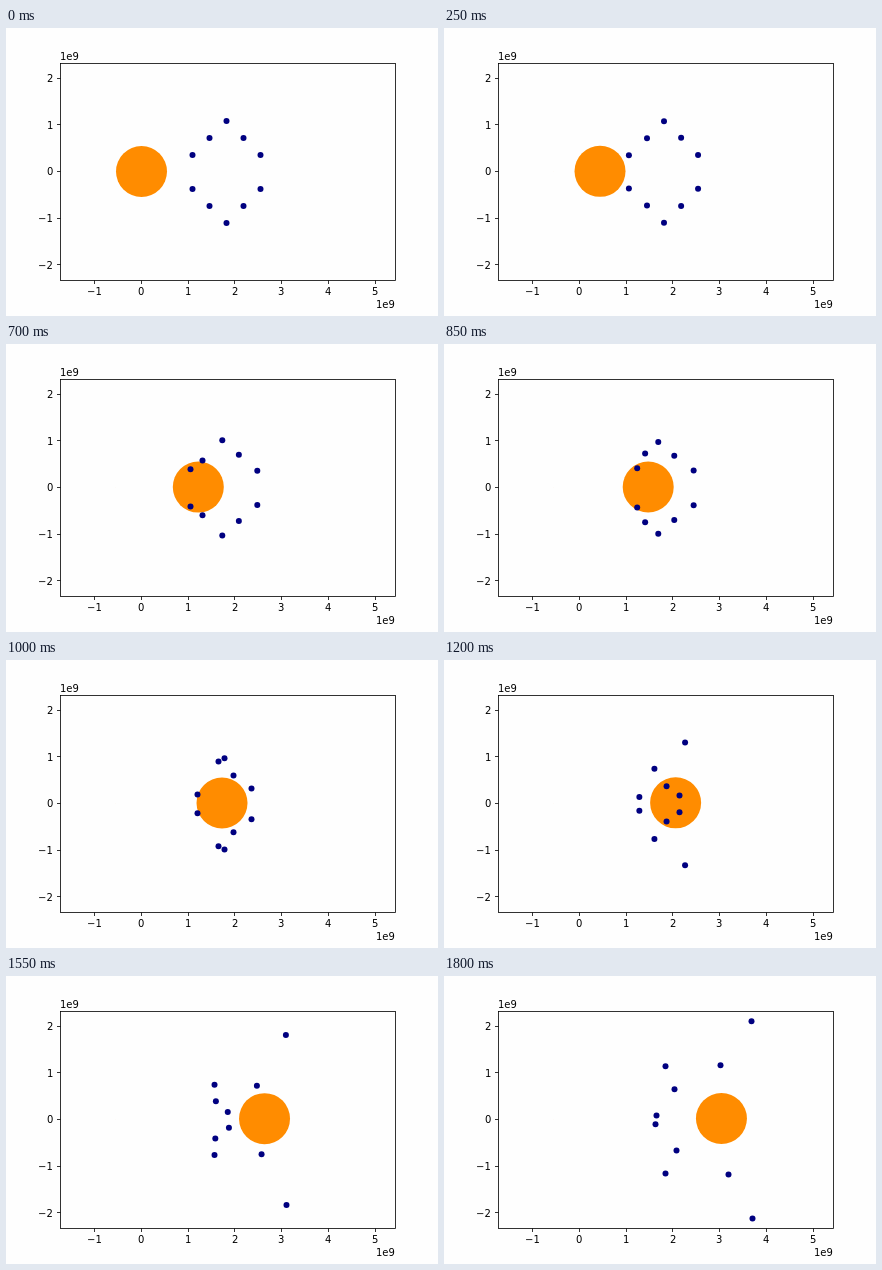
Animation of 432x288 px, one loop 1.85 s. Source, as an HTML page:

```html
<!DOCTYPE html>
<html lang="en">
<head>
<meta charset="utf-8">
<title>Flyby</title>
<style>
  html, body { margin: 0; width: 100%; height: 100%; overflow: hidden; background: #fefefe; }
  svg { display: block; width: 432px; height: 288px; }
  text { font: 10px "DejaVu Sans", sans-serif; fill: #000; }
  .axis { fill: none; stroke: #000; stroke-width: .8; }
  .star { fill: #ff8c00; }
  #dots { fill: #000080; }
</style>
</head>
<body>
<svg viewBox="0 0 432 288">
  <circle id="star" class="star" r="25.5"/>
  <g id="dots" transform="translate(.5 .5)"></g>
  <g id="axes">
    <rect class="axis" x="54.5" y="35.5" width="335" height="217"/>
    <text x="54" y="32">1e9</text>
    <text x="370" y="280">1e9</text>
  </g>
</svg>
<script>
const STEP = 50, STEPS = 37;
const ORIGIN = { x: 135.5, y: 143.5 }, UNIT = 46.72;
const RING = { x: 220, y: 143.4, gap: 17 };

const star = document.getElementById('star');
const dots = document.getElementById('dots');
const axes = document.getElementById('axes');

function add(parent, tag, attrs, text = '') {
  const el = document.createElementNS('http://www.w3.org/2000/svg', tag);
  for (const k in attrs) el.setAttribute(k, attrs[k]);
  el.textContent = text;
  parent.append(el);
  return el;
}

function place(el, x, y) {
  el.setAttribute('cx', x);
  el.setAttribute('cy', y);
}

const label = n => n < 0 ? '\u2212' + -n : String(n);
const labelWidth = n => n < 0 ? 14.7 : 6.4;
const snap = v => Math.floor(v) + .5;

for (let n = -1; n <= 5; n++) {
  const x = ORIGIN.x + n * UNIT;
  add(axes, 'path', { class: 'axis', d: `M${snap(x)} 252.5v3.5` });
  add(axes, 'text', { x: Math.round(x - labelWidth(n) / 2), y: 267 }, label(n));
}
for (let n = -2; n <= 2; n++) {
  const y = ORIGIN.y - n * UNIT;
  add(axes, 'path', { class: 'axis', d: `M54.5 ${snap(y)}h-3.5` });
  add(axes, 'text', { x: Math.round(47 - labelWidth(n)), y: Math.round(y + 3.8) }, label(n));
}

// Key points [step, x, y] of each upper dot after its rest on the ring;
// the lower dot mirrors it and falls behind by lag at the end
const tracks = [
  { lag: 1, keys: [[7, 182, 128.5], [10, 176, 134], [12, 174, 146], [14, 184, 162], [20, 218, 189], [36, 308, 242]] },
  { lag: 0, keys: [[10, 200, 112], [14, 196, 116], [20, 191, 134], [27, 200, 163], [36, 221, 197]] },
  { lag: 1, keys: [[10, 218, 94], [20, 212, 101], [27, 209, 115], [36, 212, 139]] },
  { lag: 2, keys: [[10, 235, 110], [20, 227, 115], [27, 220, 136], [36, 232, 174]] },
  { lag: 8, keys: [[10, 252, 127], [20, 245, 128], [24, 235, 135], [26, 233, 146], [28, 241, 160], [36, 284, 198]] }
];

// Smooth curve from rest through unevenly spaced key points, for one axis
function curve(pts, axis) {
  const last = pts.length - 1;
  const span = i => pts[i + 1][0] - pts[i][0];
  const slope = i => (pts[i + 1][axis] - pts[i][axis]) / span(i);
  const m = pts.map((_, i) => i > 0 && i < last
    ? (span(i) * slope(i - 1) + span(i - 1) * slope(i)) / (span(i - 1) + span(i))
    : 0);
  m[last] = 2 * slope(last - 1) - m[last - 1];

  return t => {
    let i = 0;
    while (i < last - 1 && t >= pts[i + 1][0]) i++;
    const h = span(i), u = (t - pts[i][0]) / h, v = 1 - u;
    return v * v * (1 + 2 * u) * pts[i][axis] + u * u * (3 - 2 * u) * pts[i + 1][axis]
      + h * u * v * (v * m[i] - u * m[i + 1]);
  };
}

const pairs = tracks.map(({ lag, keys }, i) => {
  const col = i - 2;
  const rest = [0, RING.x + col * RING.gap, RING.y - (3 - Math.abs(col)) * RING.gap];
  const pts = [rest, ...keys];
  return {
    lag, x: curve(pts, 1), y: curve(pts, 2),
    upper: add(dots, 'circle', { r: 3 }),
    lower: add(dots, 'circle', { r: 3 })
  };
});

function draw(t) {
  place(star, ORIGIN.x + 4.13 * t - .0052 * t * t, ORIGIN.y - t / 36);
  const late = Math.max(0, t - 24) / 12;
  for (const p of pairs) {
    const x = p.x(t), y = p.y(t);
    place(p.upper, x, y);
    place(p.lower, x - p.lag * late, 2 * RING.y - y);
  }
}

const start = performance.now();
function tick() {
  draw(Math.floor((performance.now() - start) / STEP) % STEPS);
  requestAnimationFrame(tick);
}
tick();
</script>
</body>
</html>
```
